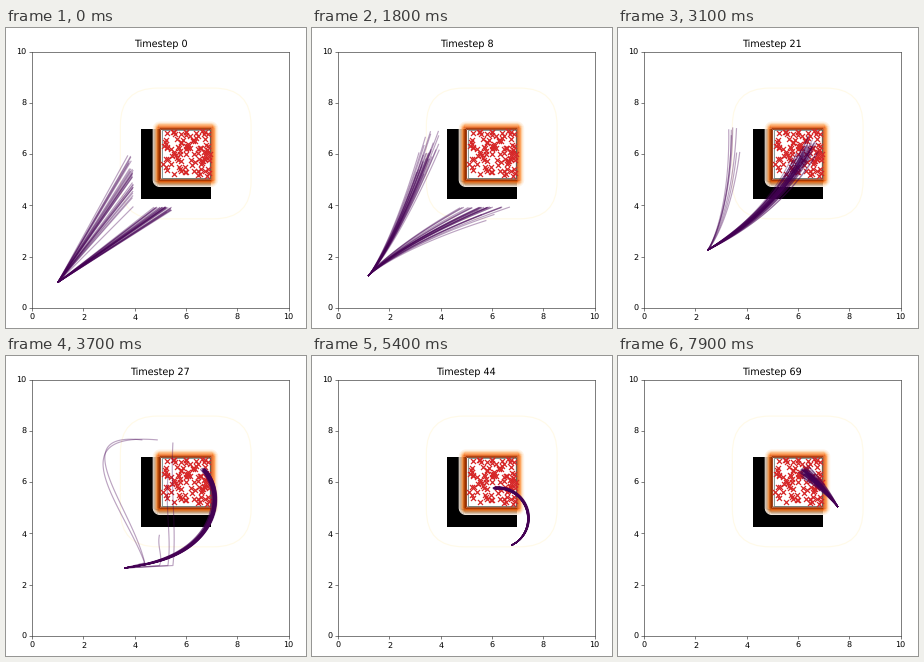
A matplotlib script that plays this animation: 300x300 px, repeating every 8000 ms.

```python
import numpy as np
import matplotlib.pyplot as plt
from matplotlib.animation import FuncAnimation
from matplotlib.collections import LineCollection
from matplotlib.patches import FancyBboxPatch, Rectangle

FRAMES, INTERVAL, HOLD = 80, 100, 10
plt.rcParams["text.hinting"] = "none"

# Robot position at a few timesteps
ROUTE_STEPS = [0, 8, 15, 27, 35, 54, 69]
ROUTE = [(1, 1), (1.17, 1.25), (1.64, 1.8), (3.59, 2.65),
         (5.34, 2.96), (7.64, 4.25), (7.56, 5.03)]

# Rollouts: first heading, last heading (degrees), turn easing, length,
# heading spread (degrees), length variation
RIGHT = [(34.5, 34.5, .6, 5.5, 1.6, .08), (50, 22, .35, 7.0, 2.2, .3),
         (50, 9, .4, 5.9, 2.4, .33), (9, 130, 1.8, 6.2, .7, .03),
         (5, 175, 1.4, 4.75, 1.0, .04), (65, 170, .7, 2.3, 1.0, .04),
         (125, 142, 1, 2.1, 4.0, .15)]
LEFT = [(54, 54, .6, 5.7, 4.5, .1), (45, 70, .3, 6.4, 1.6, .3),
        (50, 87, .4, 5.8, 3.0, .33)]


def hermite(t, knots, vals):
    """Smooth curve through vals at knots."""
    knots, vals = np.asarray(knots, float), np.asarray(vals, float)
    t = np.clip(t, knots[0], knots[-1])
    slope = np.gradient(vals, knots, axis=0)
    i = min(np.searchsorted(knots, t, side="right") - 1, len(knots) - 2)
    h = knots[i + 1] - knots[i]
    s = (t - knots[i]) / h
    return ((1 + 2 * s) * (1 - s) ** 2 * vals[i] + s * (1 - s) ** 2 * h * slope[i]
            + s * s * (3 - 2 * s) * vals[i + 1] + s * s * (s - 1) * h * slope[i + 1])


def bezier(a, b, c, d, n=60):
    t = np.linspace(0, 1, n)[:, None]
    a, b, c, d = map(np.asarray, (a, b, c, d))
    return (1 - t) ** 3 * a + 3 * t * (1 - t) ** 2 * b + 3 * t * t * (1 - t) * c + t ** 3 * d


def until_crash(path):
    """Cut a path where it reaches the padded obstacle."""
    hit = ((path > 3.95) & (path < 7.25)).all(axis=1)
    return path[:hit.argmax()] if hit.any() else path


def rollouts(step, start, keys, count, rng):
    first, last, ease, length, spread, vary = hermite(step, ROUTE_STEPS[:len(keys)], keys)
    u = np.linspace(0, 1, 70)
    lines = []
    for _ in range(count):
        noise = np.clip(rng.normal(), -2.2, 2.2) * abs(spread)
        angle = np.radians(first + (last - first) * u ** max(ease, .3) + noise)
        size = length * (1 - abs(vary) * rng.random()) / len(u)
        move = size * np.column_stack([np.cos(angle), np.sin(angle)])
        path = np.vstack([start, start + np.cumsum(move, axis=0)])
        lines.append(until_crash(path) if step <= 20 else path)
    return lines


def strays(step, start):
    """Loops round the left side and lines straight up."""
    if not 23 <= step <= 40:
        return []
    mix = np.clip((step - 27) / 8, 0, 1)
    blend = lambda a, b: (1 - mix) * np.array(a) + mix * np.array(b)
    lines = []
    for shift in (0, .3)[:2 if step < 31 else 1]:
        lead = start + (.8, .2)
        lines.append(bezier(lead, blend((3.6, 5), (4, 3.6)) + (shift, 0),
                            blend((.9, 8), (.6, 9.6)) + (shift, 0),
                            blend((4.9, 7.65), (4.55, 7.1)) - (2 * shift, 0)))
    for part in (1, .72, .25):
        lead = start + (blend(1.2 + .7 * part, .85), .1)
        rise = part * blend(4.8, 7)
        lines.append(bezier(lead, lead + (.15, .3 * rise),
                            lead + (-.1, .6 * rise), lead + (.35 * mix, rise)))
    return [np.vstack([start, line]) for line in lines]


fig = plt.figure(figsize=(5, 5), dpi=60, facecolor="white")
ax = fig.add_axes([26.2 / 300, 20 / 300, 256.3 / 300, 256.3 / 300])
ax.set(xlim=(0, 10), ylim=(0, 10), xticks=range(0, 11, 2), yticks=range(0, 11, 2))
ax.tick_params(labelsize=9.6, color="0.25")
ax.spines[:].set_color("0.25")
title = ax.set_title("Timestep 0", fontsize=11.5)

# Obstacle, goal and faint outer contour
ax.add_patch(Rectangle((4.25, 4.25), 2.73, 2.73, color="black", lw=0, zorder=1))
ax.add_patch(Rectangle((5, 5), 2, 2, color="white", lw=0, zorder=1.1))
ax.add_patch(FancyBboxPatch((3.44, 3.48), 5.1, 5.1, fill=False, ec="#fffae8", lw=1.4,
                            boxstyle="round,pad=0,rounding_size=1.45", zorder=2))

# Cost contours along the goal's edge
grid = np.linspace(4.5, 7.5, 161)
gx, gy = np.meshgrid(grid, grid)
qx, qy = abs(gx - 5.98) - 1, abs(gy - 6) - 1
dist = np.hypot(np.maximum(qx, 0), np.maximum(qy, 0)) + np.minimum(np.maximum(qx, qy), 0)
shades = plt.get_cmap("Oranges")(np.linspace(0.98, 0.02, 10))
ax.contour(gx, gy, dist, levels=np.linspace(-0.03, 0.26, 10), colors=shades,
           linewidths=1.1, zorder=2)
ax.add_patch(Rectangle((5.06, 5.06), 1.88, 1.88, fill=False, ec="#4a6a68",
                       lw=0.8, zorder=2.1))

# Goal samples
marks = np.random.default_rng(4).uniform(5.1, 6.93, (100, 2))
ax.scatter(*marks.T, marker="x", s=36, color="tab:red", linewidths=1.5, zorder=3)

paths = LineCollection([], colors="#440154", linewidths=1.4, alpha=0.36, zorder=4)
ax.add_collection(paths, autolim=False)


def draw(frame):
    step = max(0, frame - HOLD)
    rng = np.random.default_rng(100 + step)
    start = hermite(step, ROUTE_STEPS, ROUTE)
    n_right = int(np.interp(step, [15, 25], [28, 60]))
    n_left = int(np.interp(step, [15, 23], [28, 0]))
    paths.set_segments(rollouts(step, start, RIGHT, n_right, rng)
                       + rollouts(step, start, LEFT, n_left, rng)
                       + strays(step, start))
    title.set_text(f"Timestep {step}")
    return paths, title


anim = FuncAnimation(fig, draw, frames=FRAMES, interval=INTERVAL,
                     repeat=True, repeat_delay=0, blit=False)
plt.show()
```
